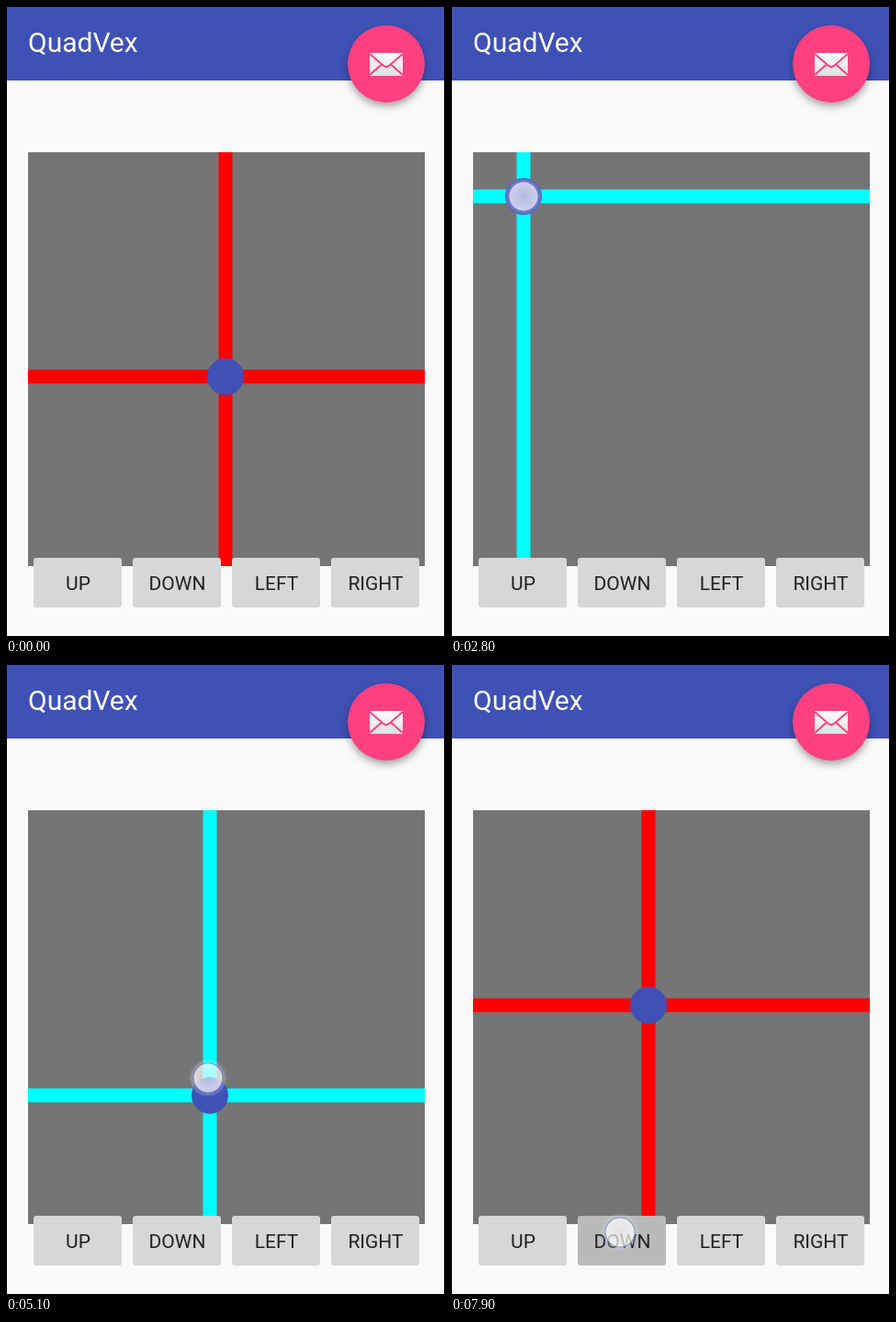
Recreate the animation shown at these times as an HTML page with a canvas. Size 478 by 685 pixels, loop 8 s.

```html
<!DOCTYPE html>
<html lang="en">
<head>
<meta charset="utf-8">
<title>QuadVex</title>
<style>
html, body { margin: 0; width: 100%; height: 100%; overflow: hidden; background: #fafafa; }
canvas { display: block; }
</style>
</head>
<body>
<canvas id="stage" width="478" height="685"></canvas>
<script>
const ctx = document.getElementById('stage').getContext('2d');
const LOOP = 8000, STEP = 100, LAG = 50;
const BLUE = '#3f51b5';
const PAD = { left: 24, top: 159, right: 456, bottom: 609 };
const BUTTONS = ['UP', 'DOWN', 'LEFT', 'RIGHT'];

// Finger path over the pad: time, x, y
const DRAG = [
  [900, 239, 403], [1000, 248, 402], [1350, 459, 398], [1500, 459, 398],
  [2150, 79, 396], [2300, 79, 396], [2700, 79, 207], [2800, 79, 207],
  [3150, 82, 190], [3450, 423, 200], [3600, 423, 200], [3850, 423, 540],
  [3950, 423, 568], [4000, 423, 578], [4150, 424, 624], [4400, 424, 624],
  [4750, 280, 590], [5050, 222, 469], [5100, 220, 450], [5350, 215, 371]
];

const clamp = (v, lo, hi) => Math.min(hi, Math.max(lo, v));

function along(path, t) {
  if (t <= path[0][0]) return { x: path[0][1], y: path[0][2] };
  for (let i = 1; i < path.length; i++) {
    const [t0, x0, y0] = path[i - 1], [t1, x1, y1] = path[i];
    if (t <= t1) {
      const k = (t - t0) / (t1 - t0);
      return { x: x0 + (x1 - x0) * k, y: y0 + (y1 - y0) * k };
    }
  }
  const [, x, y] = path[path.length - 1];
  return { x, y };
}

function ballAt(t) {
  const p = along(DRAG, t - LAG);
  // Holding a button nudges the ball one pixel per step
  const up = clamp((t - 6200) / STEP, 0, 5);
  const down = clamp((t - 7400) / STEP, 0, 5);
  return {
    x: clamp(Math.round(p.x), PAD.left, PAD.right),
    y: clamp(Math.round(p.y), PAD.top, PAD.bottom) - up + down
  };
}

function touchAt(t) {
  if (t >= 900 && t < 5700) return { ...along(DRAG, t), alpha: t < 5600 ? 1 : 0.5 };
  if (t >= 6000 && t < 6900) return { x: 83, y: 633, alpha: t < 6800 ? 1 : 0.5 };
  if (t >= 7000) return { x: 184, y: 618, alpha: 1 };
  return null;
}

function pressedAt(t) {
  if (t >= 6100 && t < 6800) return 0;
  return t >= 7100 ? 1 : -1;
}

function rect(color, x, y, w, h) {
  ctx.fillStyle = color;
  ctx.fillRect(x, y, w, h);
}

function disc(color, x, y, r) {
  ctx.fillStyle = color;
  ctx.beginPath();
  ctx.arc(x, y, r, 0, Math.PI * 2);
  ctx.fill();
}

function text(str, x, y, size, color, align) {
  ctx.font = `${size}px Roboto, sans-serif`;
  ctx.textAlign = align;
  ctx.fillStyle = color;
  ctx.fillText(str, x, y);
}

function line(...points) {
  ctx.beginPath();
  points.forEach(([x, y]) => ctx.lineTo(x, y));
  ctx.stroke();
}

function drawHeader() {
  rect('#fafafa', 0, 0, 478, 685);
  rect(BLUE, 0, 0, 478, 81);
  text('QuadVex', 24, 50, 30, '#fff', 'left');

  ctx.save();
  ctx.shadowColor = 'rgba(0,0,0,.36)';
  ctx.shadowBlur = 9;
  ctx.shadowOffsetY = 4;
  disc('#ff4081', 414, 63, 42);
  ctx.restore();

  const paper = ctx.createLinearGradient(0, 51, 0, 76);
  paper.addColorStop(0, '#fff');
  paper.addColorStop(1, '#dedede');
  rect(paper, 396, 51, 36, 25);
  ctx.strokeStyle = '#ff4081';
  ctx.lineWidth = 2;
  line([396, 52], [411, 65], [414, 66.5], [417, 65], [432, 52]);
  line([396, 75], [409, 63.5]);
  line([432, 75], [419, 63.5]);
}

function drawPad(ball, active) {
  const { left, top, right, bottom } = PAD;
  const w = right - left, h = bottom - top;
  const color = active ? '#0ff' : '#f00';
  ctx.save();
  ctx.beginPath();
  ctx.rect(left, top, w, h);
  ctx.clip();
  rect('#757575', left, top, w, h);
  rect(color, left, ball.y - 7.5, w, 15);
  rect(color, ball.x - 7.5, top, 15, h);
  disc(BLUE, ball.x, ball.y, 20);
  ctx.restore();
}

function drawButtons(pressed) {
  BUTTONS.forEach((label, i) => {
    const x = 30 + i * 108;
    ctx.fillStyle = i === pressed ? '#b9baba' : '#d6d7d7';
    ctx.beginPath();
    ctx.roundRect(x, 600, 96, 54, 3);
    ctx.fill();
    text(label, x + 48.5, 635, 21, '#212121', 'center');
  });
}

function drawTouch({ x, y, alpha }) {
  ctx.save();
  ctx.globalAlpha = alpha;
  const glow = ctx.createRadialGradient(x, y, 15, x, y, 21);
  glow.addColorStop(0, 'rgba(215,218,250,.5)');
  glow.addColorStop(1, 'rgba(215,218,250,0)');
  ctx.fillStyle = glow;
  ctx.beginPath();
  ctx.arc(x, y, 21, 0, Math.PI * 2);
  ctx.arc(x, y, 16, 0, Math.PI * 2, true);
  ctx.fill();

  const fill = ctx.createRadialGradient(x, y, 0, x, y, 16);
  fill.addColorStop(0, 'rgba(255,255,255,.6)');
  fill.addColorStop(1, 'rgba(255,255,255,.74)');
  disc(fill, x, y, 16);
  ctx.strokeStyle = 'rgba(80,85,170,.5)';
  ctx.lineWidth = 1.2;
  ctx.beginPath();
  ctx.arc(x, y, 16, 0, Math.PI * 2);
  ctx.stroke();
  ctx.restore();
}

function drawFrame() {
  rect('#000', 0, 0, 478, 1);
  rect('#000', 0, 0, 1, 685);
  rect('#000', 477, 0, 1, 685);
}

function render(now) {
  const t = Math.floor((now % LOOP) / STEP) * STEP;
  const touch = touchAt(t);
  drawHeader();
  drawPad(ballAt(t), t >= 900 && t < 5600);
  drawButtons(pressedAt(t));
  if (touch) drawTouch(touch);
  drawFrame();
}

const start = performance.now();
function tick() {
  render(performance.now() - start);
  requestAnimationFrame(tick);
}
tick();
</script>
</body>
</html>
```
